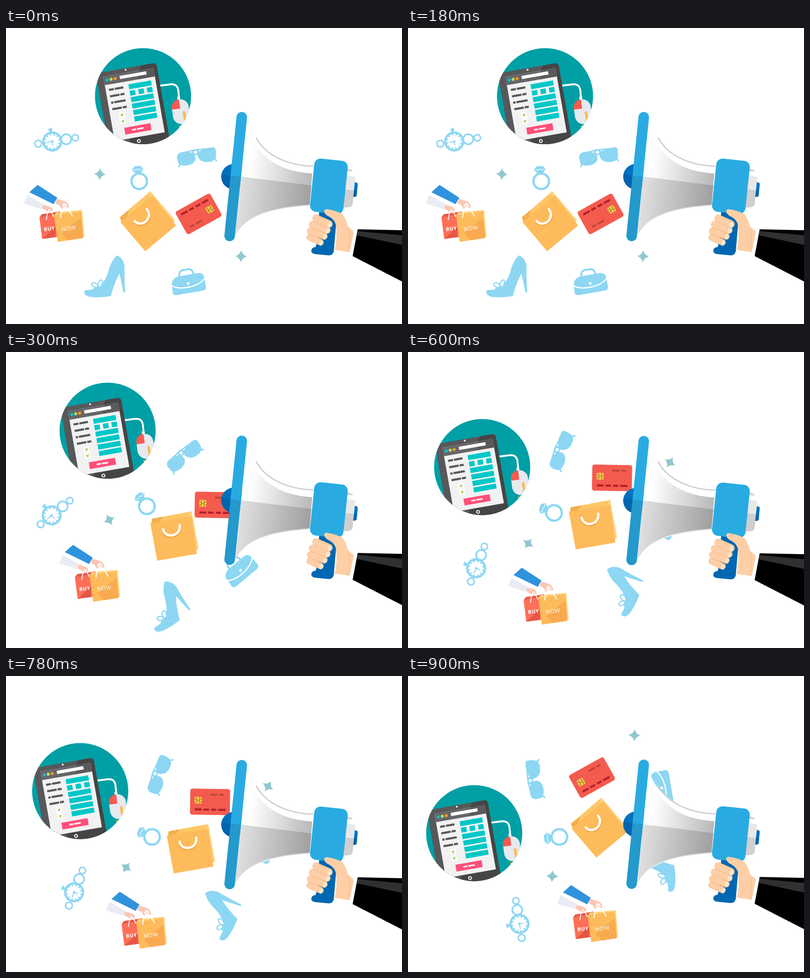
Animation of 865x647 px, one loop 1.2 s. Source, as an HTML page:

```html
<!DOCTYPE html>
<html lang="en">
<head>
<meta charset="utf-8">
<title>Shopping megaphone</title>
<style>
html, body { margin: 0; width: 100%; height: 100%; overflow: hidden; background: #fff; }
svg { display: block; width: 100%; height: 100%; }
text { font-family: "Open Sans", "Noto Sans", sans-serif; font-size: 11px; fill: #fff; letter-spacing: .7px; }
.sky { fill: #8dd7f3; }
.line { fill: none; stroke: #8dd7f3; }
.white { fill: none; stroke: #fff; stroke-linecap: round; }
</style>
</head>
<body>
<svg viewBox="0 0 865 647" xmlns="http://www.w3.org/2000/svg">
<defs>
  <clipPath id="disc"><circle r="105"/></clipPath>
  <path id="star" d="M0-13.5Q2.5-3 13 0Q3 2.5 0 13.5Q-2.5 3-13 0Q-3-2.5 0-13.5Z" fill="#92c7cf"/>
</defs>

<g id="wheel">
  <g id="tablet">
    <circle r="105" fill="#009fa5"/>
    <g clip-path="url(#disc)">
      <path d="M37-23L61-26Q75-27 77-13L79 7" class="white" stroke-width="4"/>
      <g transform="rotate(-10)">
        <rect x="-93" y="-67" width="134" height="175" rx="8" fill="#58585a"/>
        <path d="M8-67H33Q41-67 41-59V108H-50L-10-45Z" fill="#454546"/>
        <rect x="-78" y="-57" width="111" height="143" fill="#f2f2f3"/>
        <path d="M-78-57H33V-38H-78Z" fill="#666668"/>
        <path d="M2-57H33V-38H-4Z" fill="#5a5a5c"/>
        <circle cx="-27.5" cy="-63.5" r="2" fill="#fff"/>
        <circle cx="-71" cy="-48.5" r="3.4" fill="#00c4c4"/>
        <circle cx="-62.3" cy="-48.5" r="3.4" fill="#b5d96a"/>
        <circle cx="-53.5" cy="-48.5" r="3.4" fill="#f7931e"/>
        <rect x="-43" y="-52.5" width="59" height="7" fill="#fff"/>
        <g id="form"></g>
        <rect x="-52.5" y="61" width="58" height="15" fill="#ff4f79"/>
        <path d="M-36 68.5H-27M-25 68.5H-11" stroke="#fff" stroke-width="3.4"/>
        <circle cx="-26" cy="95" r="3.2" fill="none" stroke="#fff" stroke-width="2"/>
      </g>
      <g transform="translate(82 33) rotate(-8)">
        <rect x="-3" y="-32" width="6" height="8" fill="#fff"/>
        <rect x="-18" y="-26" width="37" height="54" rx="18" fill="#e6eaef"/>
        <path d="M0-26V-6H-18V-8Q-18-25 0-26Z" fill="#f45b4f"/>
        <path d="M4 3Q7-2 10 3V36H5Z" fill="#fdbb5b"/>
      </g>
      <path d="M78 65L85 64L87 73H81Z" fill="#f3c02f"/>
    </g>
  </g>

  <g transform="translate(101 248) rotate(-9)">
    <circle cx="-31" cy="0" r="7.4" class="line" stroke-width="3.2"/>
    <circle cx="31" cy="0" r="11" class="line" stroke-width="3.6"/>
    <circle cx="51" cy="0" r="7" class="line" stroke-width="3.2"/>
    <circle r="22" class="sky"/>
    <rect x="-4.5" y="-29" width="9" height="5" rx="2" class="sky"/>
    <rect x="-2.5" y="-25" width="5" height="4" class="sky"/>
    <circle r="13.5" fill="#fff"/>
    <circle r="15" fill="none" stroke="#fff" stroke-width="4" pathLength="36" stroke-dasharray="2 1"/>
    <path d="M-12 0H0V9" class="line" stroke-width="2"/>
    <circle r="2.6" class="sky"/>
  </g>

  <g id="glasses">
    <path class="sky" d="M373.500 283Q374 273 384 271.500L412 266L415 281Q414 298 395 300.500Q380 302 376 295Z"/>
    <path class="sky" d="M416 266L449 261Q457 260 458 266Q460 278 457 285Q453 293 440 293Q424 294 419 281Z"/>
    <path class="sky" d="M396 270L411 265L436 263L430 276L401 280Z"/>
    <path d="M414.500 279L417 291" class="white" stroke-width="3.500"/>
    <circle cx="414" cy="271.500" r="3.600" fill="#fff"/>
    <path d="M406.500 271L403 271.500M421.500 268L425 267.500" class="white" stroke-width="2"/>
    <path d="M382 296L377.500 303M454 283L459.500 290" class="line" stroke-width="3.400" stroke-linecap="round"/>
  </g>

  <g id="ring">
    <circle cx="291" cy="335" r="17" class="line" stroke-width="5"/>
    <path class="sky" d="M274.500 310L281 302.500L293.500 301L300.500 308L294 318H283Z"/>
    <path d="M277 309.500L284 311L288 308L292 310L298 308" class="white" stroke-width="1.200"/>
  </g>

  <g id="bag">
    <g transform="translate(-369.600 -402.900)">
      <path d="M320 364L406 348L421 429L412 437L330 400Z" fill="#fdc667"/>
      <path d="M320 364L344 360L330 378L318 376Z" fill="#f3ae4d"/>
      <path d="M400 349L406 348L421 429L414 436Z" fill="#ffd17a"/>
      <path d="M316 374L344 369L406 359L417.500 441L331 456Z" fill="#fdbb5b"/>
      <path d="M344 392C349 410 383 406 380 382" fill="none" stroke="#f3a33c" stroke-width="5"/>
      <path d="M344 387C348 409 384 403 380 378" class="white" stroke-width="5"/>
    </g>
  </g>

  <g id="card">
    <rect x="-43.500" y="-28.500" width="87" height="57" rx="5" fill="#f45b4f"/>
    <path d="M-33 17H-18M-14 17H-2M3 17H14M18 17H34" stroke="#b3202d" stroke-width="4.500"/>
    <path d="M0-16H16M20-16H30" stroke="#c2473c" stroke-width="4.500"/>
    <rect x="-34" y="-10.500" width="16" height="15" rx="4" fill="#f9cd4e"/>
    <path d="M-34-5.500H-29M-34 0H-29M-23-5.500H-18M-23 0H-18M-29-10V4M-23-10V4M-29-3H-23" stroke="#8a5a1c" fill="none"/>
  </g>

  <g id="shoppers">
    <g transform="translate(-118.500 -410.300)">
      <path d="M39 384L46 365L82 385L79 396Z" fill="#e9edf3"/>
      <path d="M51 359L69 343L112 371L104 385Z" fill="#2f93dd"/>
      <path d="M81 386L97 391Q104 396 101 401L92 403L79 394Z" fill="#fbc7b4"/>
      <path d="M73 414L118 404V456L79 461Z" fill="#fd6f57"/>
      <path d="M73 414L78 407L118 401V406Z" fill="#e9594a"/>
      <path d="M79 461L108 434V457Z" fill="#e55646"/>
      <path d="M88 419Q91 399 94 397Q99 400 104 412" class="white" stroke-width="2"/>
      <path d="M105 409L110 403L166 398L171.500 456L160 460Z" fill="#ffd073"/>
      <path d="M105 409L164 401L168.500 459L113 467.500Z" fill="#fdbb5b"/>
      <path d="M137 464L122 449L164 415L168.500 459Z" fill="#f8aa50"/>
      <path d="M111 373L130 379Q139 386 137 393L128 391L122 396L116 387L108 383Z" fill="#fbc7b4"/>
      <path d="M123 390L127 384L133 389" fill="none" stroke="#fff" stroke-width="3"/>
      <path d="M119 414Q121 398 127 390Q136 394 145 411" class="white" stroke-width="2.200"/>
      <text transform="translate(83 444) rotate(-7)" font-weight="700">BUY</text>
      <text transform="translate(122 444) rotate(-7)" style="font-size:12px">NOW</text>
    </g>
  </g>

  <g id="shoe">
    <path class="sky" d="M171 577Q171 572 178 572.500Q201 573 212 557Q221 545 226 523Q232 507 242 497Q256 502 259 520Q258 548 260.500 577L257 579L248 537Q238 553 229 586Q206 590 186 588Q171 586 171 577Z"/>
    <g fill="#fff" stroke="#8dd7f3" stroke-width="2.600">
      <ellipse cx="194" cy="562" rx="7" ry="4.500" transform="rotate(30 194 562)"/>
      <ellipse cx="206" cy="558.500" rx="4.500" ry="8" transform="rotate(20 206 558.500)"/>
      <path d="M201 566L190 571M202 567L210 570" fill="none"/>
    </g>
  </g>

  <g id="purse">
    <path d="M379 546Q376 531 387 529L400 527Q407 527 411 541" class="line" stroke-width="4"/>
    <path class="sky" d="M362 557Q365 546 377 543L420 535.500Q430 535 432.500 543L437 566Q437 573 430 574L372 584Q365 584 364 579Z"/>
    <path d="M362 563C376 574 420 567 434 547" class="white" stroke-width="2.600"/>
    <circle cx="398" cy="558.500" r="3" fill="#fff"/>
  </g>

  <use href="#star" transform="translate(205 319.500) rotate(4)"/>
  <use href="#star" transform="translate(513.300 499) rotate(3)"/>
</g>

<g id="megaphone">
  <circle cx="498" cy="325" r="28" fill="url(#deep)"/>
  <path d="M526 205C540 262 600 300 672 301L664 389C590 394 525 407 500 454Z" fill="#fff"/>
  <path d="M546 239C566 279 617 301 672 302" fill="none" stroke="#cbcbcd" stroke-width="2.600"/>
  <path d="M525 214C548 285 600 314 669 318L663 387C590 392 525 405 501 452Z" fill="url(#lit)"/>
  <path d="M514 325L667 344L663 387C590 392 525 405 501 452Z" fill="url(#shade)"/>
  <path d="M663 387C590 392 525 405 502 450" fill="none" stroke="#d9d9d9" stroke-width="2"/>
  <path d="M515 195L488.500 454.500" stroke="url(#azure)" stroke-width="23" stroke-linecap="round"/>
  <path d="M744 307Q755 308 758 314L745 313Z" fill="#d2d2d2"/>
  <path d="M744 322L763 325.500L757 386Q754 394 736 392Z" fill="url(#silver)"/>
  <path d="M762 337L766 338Q769 339 768 345L766 366Q765 370 758.500 369Z" fill="url(#deep)"/>
  <path d="M684 402L723 406L716 488Q714 497 705 497L674 494Q666 492 667 486Q668 479 676 479L680 468Z" fill="#0068b2"/>
  <rect x="-36.500" y="-58.500" width="73.500" height="117" rx="14" transform="translate(705 346) rotate(6)" fill="url(#azure)"/>
  <path d="M768 440L865 442V554L757 498.500Z"/>
  <path d="M767.500 444L865 453V474L765.500 453Z" fill="#303030"/>
  <path d="M758 442L768 440L757 498L748 489Z" fill="#fff"/>
  <path d="M695 401Q695 396 701 396Q722 399 735 407Q743 417 747 434L760 445L751 490L718 485Q724 460 721 432Q719 420 707 413Q697 409 695 401Z" fill="#fecfa6"/>
  <path d="M748 436Q754 462 746 488" fill="none" stroke="#f3bb8d"/>
  <g id="fingers" stroke-linecap="round"></g>
</g>
</svg>

<script>
const NS = "http://www.w3.org/2000/svg";
const el = id => document.getElementById(id);
const add = (parent, tag, attrs) => {
  const node = parent.appendChild(document.createElementNS(NS, tag));
  for (const key in attrs) node.setAttribute(key, attrs[key]);
  return node;
};

function gradient(id, [x1, y1, x2, y2], stops) {
  const g = add(document.querySelector("defs"), "linearGradient",
    { id, x1, y1, x2, y2, gradientUnits: "userSpaceOnUse" });
  for (const [offset, color] of stops) add(g, "stop", { offset, "stop-color": color });
}
// Lit and shaded halves meet along the axis of the horn.
const across = [628, 238, 604, 437], along = [514, 325, 667, 344];
const halves = (id, lit, shade) => gradient(id, across, [[0.5, lit], [0.5, shade]]);
halves("azure", "#29abe2", "#2499cc");
halves("deep", "#0071bc", "#0064ae");
halves("silver", "#e8e8e8", "#cfcfcf");
gradient("lit", along, [[0.1, "#fff"], [1, "#b8b8b8"]]);
gradient("shade", along, [[0, "#e0e0e0"], [1, "#a0a0a0"]]);

const form = el("form");
const bar = (x, y, width, height, fill) => add(form, "rect", { x, y, width, height, fill });
const lineAt = (top, i) => top + i * 14.3;
[11, 21, 5, 21].forEach((width, i) => {
  const y = lineAt(-28.7, i);
  bar(-71, y, width, 4.6, "#58585a");
  bar(-69 + width, y, 30 - width, 4.6, "#58585a");
});
for (let i = 0; i < 6; i++) {
  const boxes = i === 1 ? 3 : 1;
  for (let j = 0; j < boxes; j++) bar(-27 + 19 * j, lineAt(-31, i), boxes > 1 ? 12 : 50, 11, "#00c8c8");
}
for (const y of [32, 46]) {
  bar(-58.5, y - 6, 12, 12, "#fff");
  add(form, "path", { d: `M-57 ${y}l8-3-3.5 8-1.5-4z`, fill: "#9ccb4a" });
}

for (let i = 3; i >= 0; i--) {
  const x = 705 - 3 * i - i * i, y = 428.5 + 13.3 * i, width = 17 - i;
  const d = `M${663.5 + 1.6 * (3 - i) ** 2} ${416.5 + 13.7 * i}L${x} ${y}`;
  add(el("fingers"), "path", { d, stroke: "#eeb384", "stroke-width": width });
  add(el("fingers"), "path", { d, stroke: "#fecfa6", "stroke-width": width - 1.6 });
  add(el("fingers"), "ellipse", {
    cx: x + 2, cy: y + 1, rx: 4, ry: 6, fill: "#fde6cb", transform: `rotate(22 ${x} ${y})`
  });
}

// The goods ride a wheel that turns by TURN degrees per step while its hub shakes.
const STEP = 300, TURN = -30;
const hubs = [[318.2, 325.4], [326.5, 315.4], [324.3, 323.4], [321, 324.6]];
const move = (id, transform) => el(id).setAttribute("transform", transform);

function render(time) {
  const step = Math.floor(time / STEP) % hubs.length;
  const turn = TURN * step;
  const sway = step % 3 === 0 ? -30 : 0;
  const flip = step === 0 ? 180 : 0;
  // Angles of these parts are relative to the stage, not the wheel.
  const ride = (id, x, y, angle) => move(id, `translate(${x} ${y}) rotate(${angle - turn})`);

  move("wheel", `translate(${hubs[step]}) rotate(${turn}) translate(${hubs[0].map(v => -v)})`);
  ride("tablet", 299.3, 149, 0);
  ride("shoppers", 118.5, 410.3, 0);
  ride("bag", 311, 422.7, sway);
  ride("card", 420.7, 406.4, sway + flip + 1);
  move("megaphone", `translate(0 ${step % 2 * -0.7})`);
}

let start;
function tick(now) {
  start ??= now;
  render(now - start);
  requestAnimationFrame(tick);
}
render(0);
requestAnimationFrame(tick);
</script>
</body>
</html>
```
